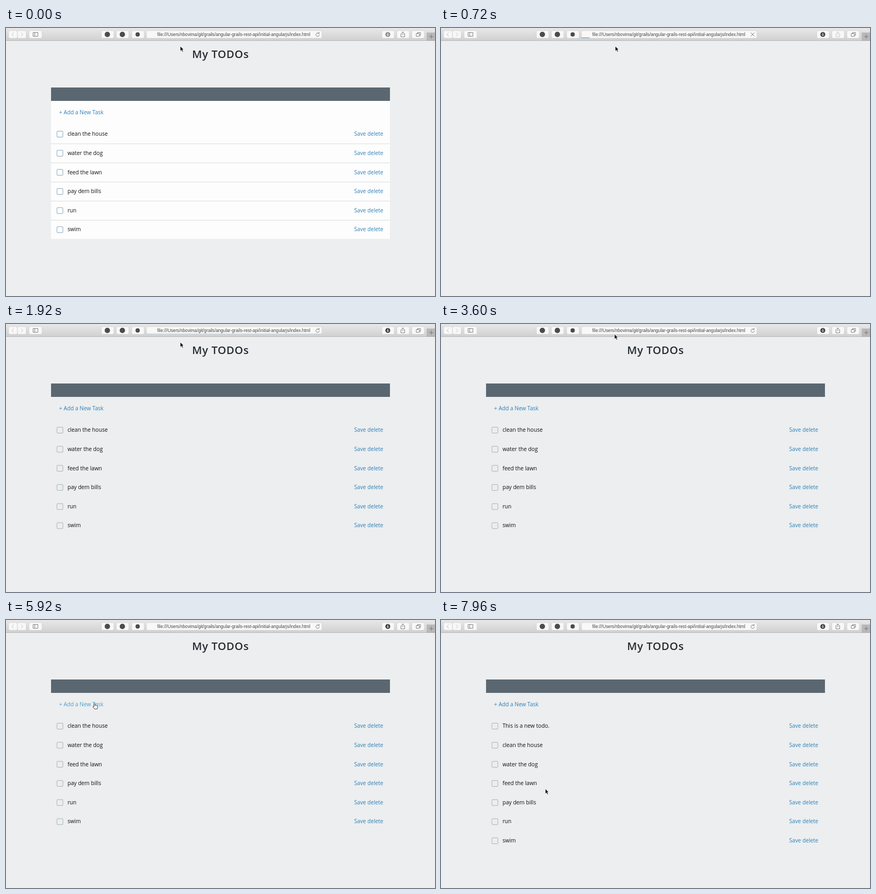
Animation of 800x500 px, one loop 8000 ms. Source, as an HTML page:

```html
<!DOCTYPE html>
<html lang="en">
<head>
<meta charset="utf-8">
<title>My TODOs</title>
<style>
  html, body { margin: 0; width: 100%; height: 100%; overflow: hidden; background: #eceeef; }
  svg { display: block; width: 800px; height: 500px; }
  text { font: 10.2px "Open Sans", sans-serif; fill: #111; }
  .title { font-size: 20px; font-weight: 600; letter-spacing: .6px; fill: #262b32; text-anchor: middle; }
  .url { font: 8.2px "Liberation Sans", Arial, sans-serif; fill: #444; }
  .link { fill: #2d80b8; }
  .end { text-anchor: end; }
  .button { fill: #f8f8f8; stroke: #c9c9c9; stroke-width: .5; }
  .icon { fill: none; stroke: #777; stroke-width: .9; }
  .box { fill: none; stroke: #a9b3b8; }
  .white .box { fill: #fff; stroke: #8ca6b8; }
  .divider { stroke: #d9dcdd; display: none; }
  .white .divider { display: inline; }
</style>
</head>
<body>
<svg viewBox="0 0 800 500">
  <defs>
    <linearGradient id="chrome" x2="0" y2="1">
      <stop stop-color="#e8e8e8"/><stop offset="1" stop-color="#d1d1d1"/>
    </linearGradient>
  </defs>
  <rect width="800" height="500" fill="#eceeef"/>

  <g id="page">
    <text class="title" x="400" y="55.5">My TODOs</text>
    <rect id="panel" x="84" y="111" width="632" height="282.5" fill="#fdfdfd"/>
    <rect x="84" y="111" width="632" height="25" fill="#5b6770"/>
    <text id="add" class="link" x="99" y="161">+ Add a New Task</text>
    <g id="rows"></g>
  </g>

  <rect width="800" height="23" fill="url(#chrome)"/>
  <path d="M0 23.5H800" stroke="#b8b8b8"/>
  <g id="buttons"></g>
  <g class="icon">
    <path d="M14.5 8.5l-3.5 3.5 3.5 3.5M28 8.5l3.5 3.5-3.5 3.5" stroke="#bbb"/>
    <path d="M50.5 8.5h9v7h-9zM53.5 8.5v7"/>
    <path d="M765 10.5h6v5h-6zM767 10.5v-2h6v5h-2"/>
    <path id="share" d="M738 10.5h-1.5v6h7v-6H742M740 13.5v-6.5M738 9l2-2 2 2"/>
    <path id="reload" d="M583.5 10a3.3 3.3 0 1 0 1 2.5M584 7.5v2.8h-2.8"/>
    <path id="stop" d="M577.5 8.5l7 7M584.5 8.5l-7 7"/>
  </g>
  <g fill="#4b4b4b">
    <circle cx="189" cy="12" r="5"/>
    <circle cx="217" cy="12" r="5"/>
    <circle cx="245.5" cy="12" r="4"/>
  </g>
  <circle id="download" cx="712" cy="12" r="4.6"/>
  <path d="M712 9v5M710 12.3l2 2 2-2" fill="none" stroke="#fff"/>
  <rect x="785" y="9" width="15" height="14.5" fill="#b9b9b9" stroke="#a5a5a5" stroke-width=".6"/>
  <path d="M789 16h8M793 12v8" stroke="#777"/>
  <text class="url" x="282" y="15">file:///Users/nbovima/git/grails/angular-grails-rest-api/initial-angularjs/index.html</text>
  <rect id="progress" x="262" y="17.6" height="1.2" fill="#58a9ec"/>

  <g id="cursor">
    <path id="arrow" d="M0 0V9.2L2.2 7.2 3.8 10.6 5.4 9.9 3.9 6.6H6.5Z" fill="#000" stroke="#fff" stroke-width=".7"/>
    <path id="hand" d="M-1.2 .7Q0-.7 1 .7V4Q2 3.2 2.7 4.2 3.7 3.7 4.2 4.8 5.5 4.5 5.4 6L4.5 10.5H-.5L-3.4 6.5Q-3.4 5-2 5.5L-1.2 6.2Z" fill="#fff" stroke="#222" stroke-width=".8"/>
  </g>
</svg>
<script>
const LOOP = 8000, RELOAD = 600, LOADED = 1000, ADDED = 6320;
const HOVER = [5480, 6760];
const TASKS = ["clean the house", "water the dog", "feed the lawn", "pay dem bills", "run", "swim"];
const BUTTONS = [[5, 16], [21.5, 16], [43, 24], [178, 23], [206, 23], [234.5, 23],
                 [262, 327], [701, 23], [729, 23], [757, 23]];
// Pointer stops: time, x, y
const STOPS = [[0, 325, 34], [3200, 325, 34], [3560, 323.5, 19], [3900, 323.5, 19],
               [4800, 201, 125], [5000, 201, 125], [5600, 165.5, 155.5], [6640, 165.5, 155.5],
               [7440, 194.5, 315], [LOOP, 194.5, 315]];

const el = id => document.getElementById(id);
const show = (id, visible) => el(id).style.display = visible ? "inline" : "none";
const clamp = v => Math.max(0, Math.min(1, v));
const ease = p => p * p * (3 - 2 * p);

el("buttons").innerHTML = BUTTONS.map(([x, w]) =>
  `<rect class="button" x="${x}" y="5" width="${w}" height="14" rx="2.5"/>`).join("");

function taskRow(label, i) {
  const y = 198 + i * 35.65;
  return `<rect class="box" x="95" y="${y - 5.5}" width="11" height="11" rx="1"/>
    <text x="114.7" y="${y + 3.2}">${label}</text>
    <text class="link end" x="703.5" y="${y + 3.2}">Save delete</text>` +
    (i < 5 ? `<path class="divider" d="M84 ${y + 18}H716"/>` : "");
}

let shownCount = 0;
function setTasks(tasks) {
  if (tasks.length === shownCount) return;
  shownCount = tasks.length;
  el("rows").innerHTML = tasks.map(taskRow).join("");
}

function pointerAt(t) {
  const next = STOPS.findIndex(s => s[0] > t);
  const [t0, x0, y0] = STOPS[next - 1], [t1, x1, y1] = STOPS[next];
  const p = ease((t - t0) / (t1 - t0));
  return [x0 + (x1 - x0) * p, y0 + (y1 - y0) * p];
}

function draw(t) {
  const fresh = t < RELOAD, loading = !fresh && t < LOADED;
  const hovering = t >= HOVER[0] && t < HOVER[1];

  show("page", !loading);
  show("panel", fresh);
  el("page").classList.toggle("white", fresh);
  setTasks(t < ADDED ? TASKS : ["This is a new todo.", ...TASKS]);
  el("add").style.fill = hovering ? "#4ba0d3" : "";

  show("stop", loading);
  show("reload", !loading);
  el("share").style.stroke = loading ? "#c4c4c4" : "";
  el("download").style.fill = fresh ? "#8c8c8c" : "#3e3e3e";

  const fill = loading ? 15 : 15 + 312 * clamp((t - LOADED) / 300);
  el("progress").setAttribute("width", fresh ? 0 : fill);
  el("progress").style.opacity = clamp((2100 - t) / 600);

  el("cursor").setAttribute("transform", `translate(${pointerAt(t)})`);
  show("arrow", !hovering);
  show("hand", hovering);
}

const start = performance.now();
function tick() {
  draw((performance.now() - start) % LOOP);
  requestAnimationFrame(tick);
}
tick();
</script>
</body>
</html>
```
